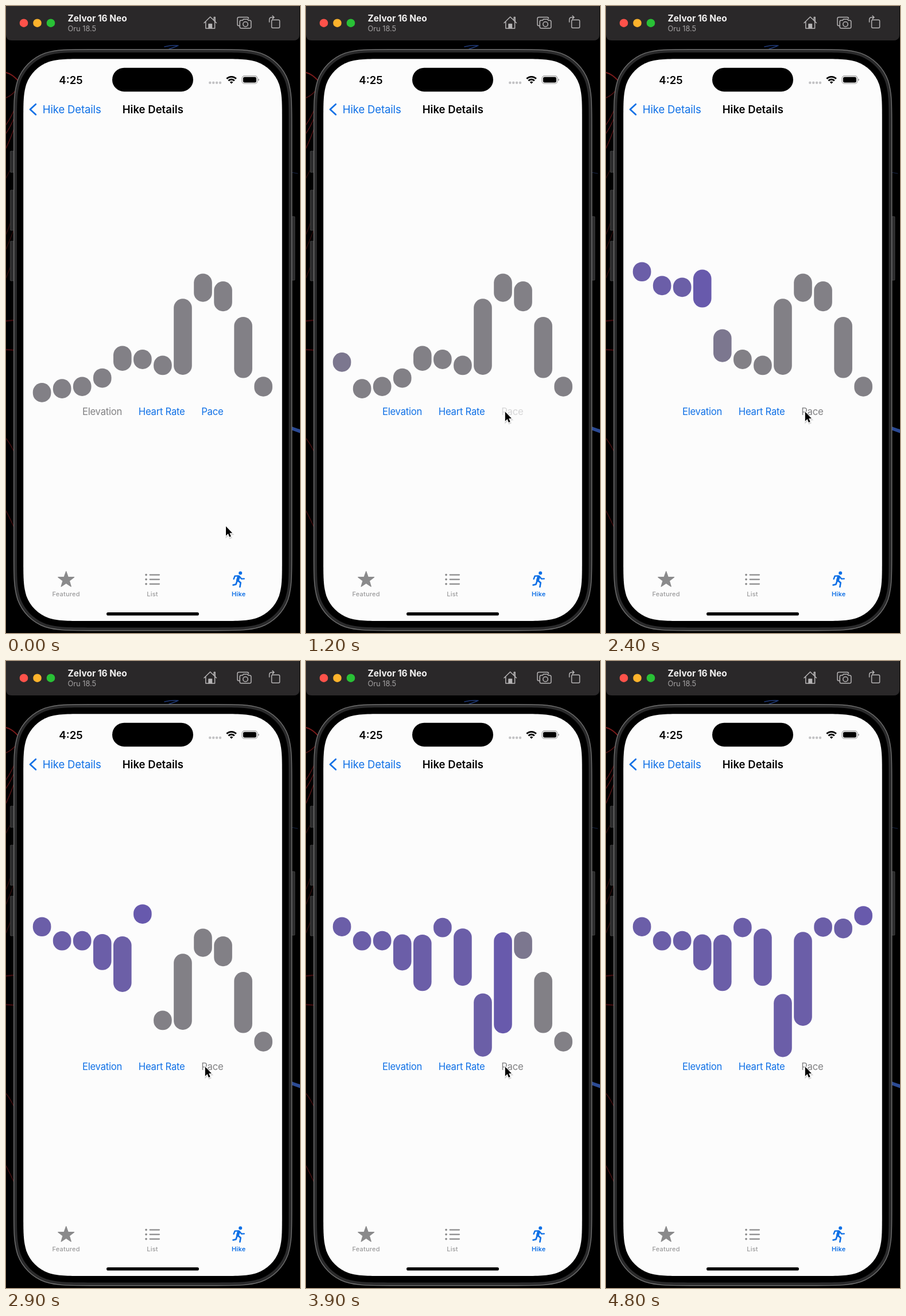
These frames come from a looping animation (512 by 1093 pixels, 4.9 s). An HTML page:

```html
<!DOCTYPE html>
<html lang="en">
<head>
<meta charset="utf-8">
<title>Hike Details</title>
<style>
  html, body { margin: 0; width: 100%; height: 100%; overflow: hidden; background: #000; }
  svg { display: block; width: 100%; height: 100%; }
  text { font-family: Inter, "Liberation Sans", sans-serif; }
  .nav { font-size: 18.5px; letter-spacing: -.007em; }
  .title { font-weight: 600; letter-spacing: .002em; text-anchor: middle; }
  .choice { font-size: 16.7px; letter-spacing: -.016em; text-anchor: middle; }
  .tab { font-size: 11px; font-weight: 500; letter-spacing: .02em; text-anchor: middle; }
  .active { font-weight: 600; }
  .line { fill: none; stroke-linecap: round; stroke-linejoin: round; }
</style>
</head>
<body>
<svg viewBox="0 0 512 1093" xmlns="http://www.w3.org/2000/svg">
  <rect width="512" height="1093" fill="#000"/>

  <!-- wallpaper strands -->
  <g class="line" stroke="#561214" stroke-width="1.4">
    <path d="M0 116Q10 118 22 131" stroke="#7c1b1b" stroke-width="2"/>
    <path d="M0 160Q10 156 18 146M0 207Q12 190 20 166M0 222Q12 204 20 180M0 248Q12 222 20 196"/>
    <path d="M0 300Q10 280 18 268M0 398Q8 380 16 350M0 424Q10 400 16 384M0 474Q8 455 16 432" stroke="#350d0d" stroke-width="1.2"/>
    <path d="M0 549L16 547.5M0 599L16 600" stroke="#3c0a0d" stroke-width="2.4"/>
    <path d="M0 754Q7 762 15 779M0 880Q7 893 15 911" stroke="#480f11"/>
    <path d="M276 71Q288 68 300 69M284 75L298 70" stroke="#203a78"/>
    <path d="M497 290L508 292" stroke="#182748" stroke-width="1"/>
    <path d="M497 736L514 742" stroke="#2b4a94" stroke-width="6"/>
  </g>

  <!-- window bar -->
  <path d="M0 0H511V50Q511 60 501 60H10Q0 60 0 50Z" fill="#2a2829"/>
  <circle cx="31" cy="29.7" r="7.3" fill="#fe524a"/>
  <circle cx="54.5" cy="29.7" r="7.3" fill="#fdb32c"/>
  <circle cx="78" cy="29.7" r="7.3" fill="#29c136"/>
  <text x="107.5" y="27" font-size="15.5" font-weight="700" fill="#f3f2f2">Zelvor 16 Neo</text>
  <text x="107.5" y="43.8" font-size="12.8" fill="#a6a4a5">Oru 18.5</text>
  <g class="line" stroke="#b5b3b4" stroke-width="1.5">
    <path d="M345 29.5L355.7 19L366.5 29.5M347.8 27.5V39H363.6V27.5M362.3 24.5V19.5H364.2V26.5"/>
    <path d="M353 39V31.5H358.4V39" fill="#b5b3b4"/>
    <path d="M407 34.5H405.5Q403 34.5 403 32V22Q403 19.6 405.5 19.6H420Q422.4 19.6 422.5 22"/>
    <path d="M409.5 25H412L413.5 23H420.5L422 25H424.5Q426.8 25 426.8 27.3V36.5Q426.8 38.8 424.5 38.8H409.5Q407.2 38.8 407.2 36.5V27.3Q407.2 25 409.5 25Z"/>
    <circle cx="417" cy="31.7" r="4.2"/>
    <rect x="462.6" y="24.2" width="14" height="14" rx="2"/>
    <path d="M458.6 28V24Q458.6 19.8 463 19.8H466.5M464 17L467 19.8L464 22.6"/>
  </g>

  <!-- device -->
  <g fill="#2c2c2d" stroke="#4a4a4a" stroke-width=".8">
    <rect x="7.4" y="253" width="8" height="37" rx="1"/>
    <rect x="7.4" y="321" width="8" height="70" rx="1"/>
    <rect x="7.4" y="410" width="8" height="69" rx="1"/>
    <rect x="495" y="367" width="8" height="111" rx="1"/>
  </g>
  <path id="frame" fill="#2a2a2b" stroke="#707070" stroke-width="1.4"/>
  <path id="bezel" fill="#000"/>
  <path id="screen" fill="#fcfcfc"/>
  <rect x="185" y="107.7" width="141" height="41.5" rx="20.75" fill="#000"/>
  <rect x="175" y="1057" width="161" height="5.6" rx="2.8" fill="#000"/>

  <!-- status bar -->
  <text x="113" y="135.5" font-size="18.6" font-weight="600" text-anchor="middle" fill="#000">4:25</text>
  <g fill="#c2c2c4">
    <circle cx="355.3" cy="133.8" r="2.2"/><circle cx="361.2" cy="133.8" r="2.2"/>
    <circle cx="367.1" cy="133.8" r="2.2"/><circle cx="373" cy="133.8" r="2.2"/>
  </g>
  <g fill="none" stroke="#000" stroke-width="2.8">
    <path d="M384.3 126.7A11.8 11.8 0 0 1 400.9 126.7"/>
    <path d="M387.4 130.2A7.2 7.2 0 0 1 397.8 130.2"/>
    <path d="M389.8 132.7Q392.6 130.4 395.4 132.7L392.6 135.5Z" fill="#000" stroke="none"/>
  </g>
  <rect x="411" y="121.9" width="26.8" height="13.4" rx="4.4" fill="none" stroke="#9c9c9c" stroke-width="1.1"/>
  <rect x="412.9" y="123.8" width="23" height="9.6" rx="2.7" fill="#000"/>
  <path d="M439 126.4Q441 127 441 128.6T439 130.8Z" fill="#9c9c9c"/>

  <!-- navigation -->
  <path class="line" d="M51.8 171.3L42 180.3L51.8 189.3" stroke="#0f70e6" stroke-width="2.8"/>
  <text class="nav" x="63.8" y="187" fill="#0f70e6">Hike Details</text>
  <text class="nav title" x="255.8" y="187" fill="#000">Hike Details</text>

  <g id="bars"></g>

  <text class="choice" id="elevation" x="167.5" y="713">Elevation</text>
  <text class="choice" x="271.2" y="713" fill="#0f70e6">Heart Rate</text>
  <text class="choice" id="pace" x="359.3" y="713">Pace</text>

  <!-- tabs -->
  <path id="star" fill="#8a8a8b" stroke="#8a8a8b" stroke-width="1.2" stroke-linejoin="round"/>
  <g class="line" stroke="#8a8a8b" stroke-width="2.1">
    <path d="M250.6 991.6H267M250.6 999.6H267M250.6 1007.6H267"/>
    <path d="M244 991.6h.1M244 999.6h.1M244 1007.6h.1" stroke-width="3.6"/>
  </g>
  <g class="line" stroke="#0f70e6" stroke-width="2.4">
    <circle cx="408.2" cy="988.5" r="3" fill="#0f70e6" stroke="none"/>
    <path d="M405.2 995L403.4 1001.2" stroke-width="5"/>
    <path d="M406.6 994.4L410 998.6L414.8 998.4M404.2 993.4L398.6 993.8L396.6 998.8"/>
    <path d="M404 1001.6L408.6 1005.4L407.4 1012.6M402.2 1003L400.4 1008.2L395.6 1009.4" stroke-width="2.7"/>
  </g>
  <text class="tab" x="104.6" y="1029" fill="#9a9a9b">Featured</text>
  <text class="tab" x="255" y="1029" fill="#9a9a9b">List</text>
  <text class="tab active" x="405.2" y="1029" fill="#0f70e6">Hike</text>

  <g id="cursor">
    <path d="M0 0V16.4L3.8 12.8L6.2 18.6L8.8 17.5L6.4 11.8H11.2Z" transform="translate(.6 2)" fill="#000" stroke="#000" stroke-width="2.4" opacity=".14"/>
    <path d="M0 0V16.4L3.8 12.8L6.2 18.6L8.8 17.5L6.4 11.8H11.2Z" fill="#000" stroke="#fff" stroke-width="2" paint-order="stroke" stroke-linejoin="round"/>
  </g>
</svg>

<script>
const LOOP = 4900, STEP = 100;
const BLUE = '#0f70e6', DISABLED = '#818183';
const GRAY = [130, 128, 134], PURPLE = [107, 94, 168];
const PRESS = 1000, RELEASE = 1100;
const RIPPLE_START = 1134, RIPPLE_GAP = 300;

// resting top and bottom of each capsule
const elevationRanges = [
  [657, 690.7], [650.3, 684], [646.5, 680], [631.7, 665.5], [592.5, 636], [599, 633],
  [609.5, 643.3], [510.3, 643], [466.5, 515.7], [480, 532.2], [542, 648.6], [646.3, 680.7]
];
const paceRanges = [
  [446.4, 480], [471, 504.6], [470.7, 504.4], [476.6, 539.4], [477, 575.3], [447.7, 481.5],
  [466.5, 566.3], [580.5, 690.5], [472.3, 636], [447, 480.8], [447.5, 480.8], [448.9, 482.6]
];

const byId = id => document.getElementById(id);
const clamp = x => Math.max(0, Math.min(1, x));
const mix = (a, b, p) => a + (b - a) * p;
const smooth = x => x * x * (3 - 2 * x);

// rectangle whose corners ease into the straight edges
function continuousRect(id, left, top, right, bottom, r) {
  const corner = (x, y, dx, dy, flip) => {
    const at = (u, v) => flip ? `${x + dx * v * r} ${y + dy * u * r}` : `${x + dx * u * r} ${y + dy * v * r}`;
    return `${at(1.529, 0)}C${at(1.088, 0)} ${at(.868, 0)} ${at(.631, .075)}`
      + `C${at(.373, .169)} ${at(.169, .373)} ${at(.075, .631)}`
      + `C${at(0, .868)} ${at(0, 1.088)} ${at(0, 1.529)}`;
  };
  const corners = [
    corner(left, top, 1, 1, true), corner(right, top, -1, 1, false),
    corner(right, bottom, -1, -1, true), corner(left, bottom, 1, -1, false)
  ];
  byId(id).setAttribute('d', `M${corners.join('L')}Z`);
}
continuousRect('frame', 13.7, 75.7, 497.7, 1088.7, 86);
continuousRect('bezel', 19, 81, 492.4, 1083.4, 80.7);
continuousRect('screen', 30.2, 92.3, 480.8, 1072, 69.5);

const bars = elevationRanges.map((_, i) => {
  const bar = document.createElementNS('http://www.w3.org/2000/svg', 'rect');
  bar.setAttribute('x', 46.8 + 35.05 * i);
  bar.setAttribute('width', 31.6);
  bar.setAttribute('rx', 15.8);
  return byId('bars').appendChild(bar);
});

const starPoints = Array.from({ length: 10 }, (_, k) => {
  const r = k % 2 ? 6 : 14.6, a = k * Math.PI / 5;
  return `${104.7 + r * Math.sin(a)} ${1000.2 - r * Math.cos(a)}`;
});
byId('star').setAttribute('d', `M${starPoints.join('L')}Z`);

// spring with response 0.5 s and damping fraction 0.5
function spring(ms) {
  if (ms <= 0) return 0;
  const x = ms / 1000 * 4 * Math.PI, s = Math.sqrt(.75);
  return 1 - Math.exp(-x / 2) * (Math.cos(s * x) + .5 / s * Math.sin(s * x));
}

function drawBars(t) {
  bars.forEach((bar, i) => {
    const p = spring(t - RIPPLE_START - RIPPLE_GAP * i);
    const [top, bottom] = [0, 1].map(k => mix(elevationRanges[i][k], paceRanges[i][k], p));
    bar.setAttribute('y', top);
    bar.setAttribute('height', bottom - top);
    bar.setAttribute('fill', `rgb(${GRAY.map((c, k) => Math.round(mix(c, PURPLE[k], p)))})`);
  });
}

function draw(t) {
  drawBars(t);
  const chosen = t >= RELEASE;
  byId('elevation').setAttribute('fill', chosen ? BLUE : DISABLED);
  byId('pace').setAttribute('fill', chosen ? DISABLED : BLUE);
  const recovery = smooth(clamp((t - RELEASE) / 450));
  byId('pace').setAttribute('opacity', t < PRESS ? 1 : mix(.2, 1, recovery));

  const p = smooth(clamp((t - 50) / 800));
  byId('cursor').setAttribute('transform', `translate(${mix(383, 346.8, p)} ${mix(907, 707.3, p)})`);
}

const start = performance.now();
function tick(now) {
  const t = Math.max(0, now - start + 15) % LOOP;
  draw(Math.floor(t / STEP) * STEP);
  requestAnimationFrame(tick);
}
draw(0);
requestAnimationFrame(tick);
</script>
</body>
</html>
```
